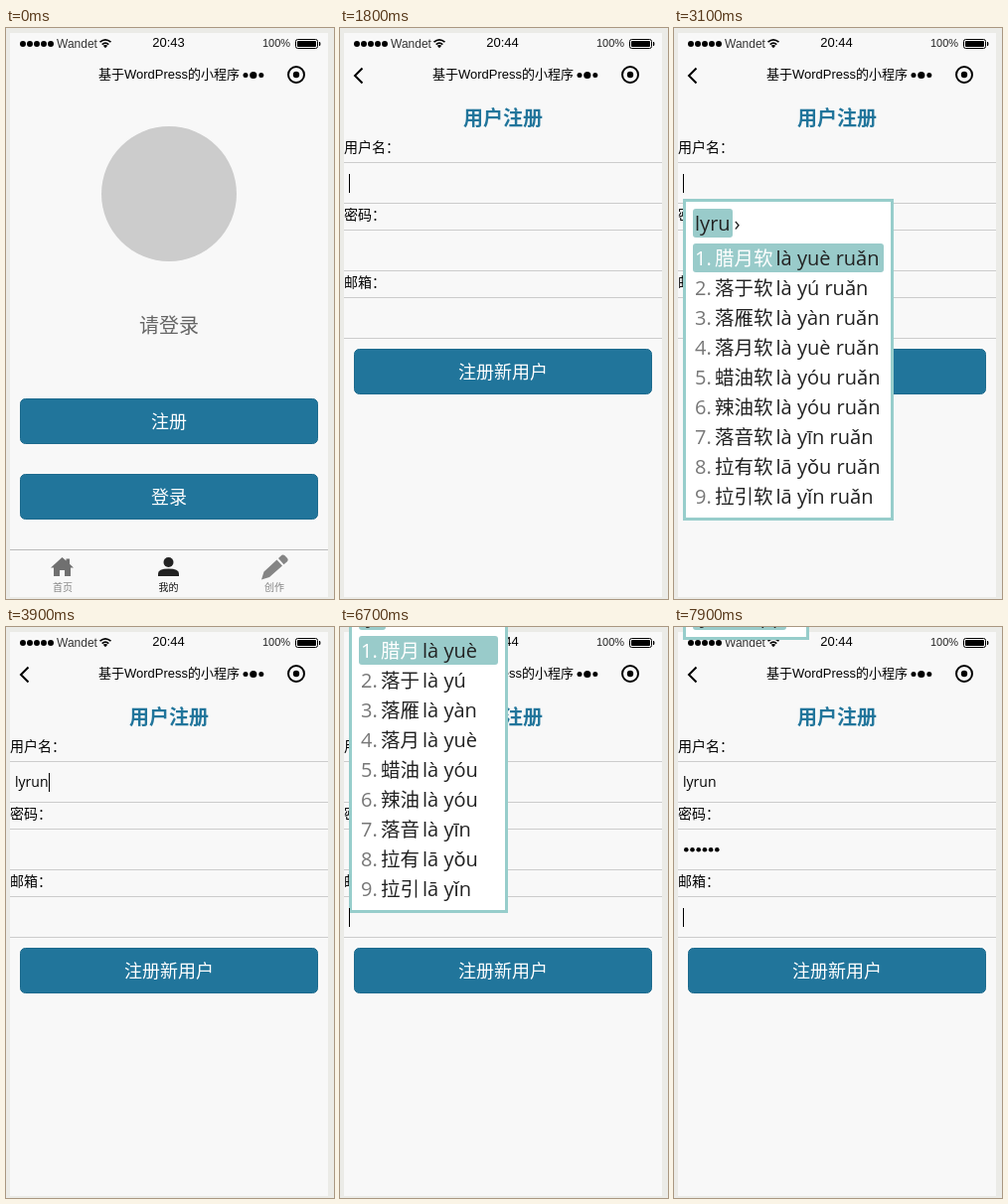
Animation, 330 px wide and 575 px high, one loop 8000 ms. Source, as an HTML page:

```html
<!DOCTYPE html>
<html lang="zh-CN">
<head>
<meta charset="utf-8">
<title>小程序注册</title>
<style>
  html, body { margin: 0; width: 100%; height: 100%; overflow: hidden; background: #ebebe7; }
  body, text { font-family: "Liberation Sans", "Noto Sans CJK SC", "Noto Sans CJK", sans-serif; }
  #stage { position: relative; width: 330px; height: 575px; overflow: hidden; }
  svg { position: absolute; left: 0; top: 0; }
  [data-on] { visibility: hidden; }
  .mid { text-anchor: middle; }
  .label { font-size: 14px; }
  .hint { font-size: 14px; fill: #858585; }
  .tab { font-size: 10px; fill: #858585; text-anchor: middle; }
  .btn { font-size: 18px; fill: #fff; text-anchor: middle; }
  .typed { font: 14px "Open Sans", "Noto Sans", sans-serif; }
  .blue { fill: #21759b; stroke: #1d6a8d; }
  .rule { stroke: #ccc; fill: none; }
  .caret { position: absolute; width: 1px; height: 19px; background: #000; }
  .ime {
    position: absolute; left: 9px; box-sizing: border-box; padding: 7px;
    border: 3px solid #97cdcb; background: #fff; color: #222; white-space: nowrap;
    font: 20px/29px "Open Sans", "Noto Sans", "Noto Sans CJK SC", sans-serif;
  }
  .head, .row { display: flex; height: 29px; }
  .head b { font-weight: 400; padding: 0 2px; border-radius: 3px; background: #99cbca; }
  .head i { font-style: normal; width: 13px; text-indent: 2px; }
  .row { margin-bottom: 1px; border-radius: 3px; padding-left: 2px; }
  .head + .row { margin-top: 6px; background: #99cbca; }
  .num { width: 20px; color: #777; }
  .han { font-size: 19.5px; margin-right: 3px; }
  .head + .row .num, .head + .row .han { color: #fff; }
</style>
</head>
<body>
<div id="stage">
<svg width="330" height="575" viewBox="0 0 330 575">
  <rect x="4" y="5" width="320" height="568" fill="#f8f8f8"/>

  <!-- status and title bars -->
  <g>
    <circle cx="17" cy="16" r="3"/><circle cx="24" cy="16" r="3"/><circle cx="31" cy="16" r="3"/>
    <circle cx="38" cy="16" r="3"/><circle cx="45" cy="16" r="3"/>
    <text x="51" y="19.5" font-size="12" fill="#333">Wandet</text>
    <g fill="none" stroke="#000" stroke-width="1.6">
      <path d="M94.5 14.2Q100 9.4 105.500 14.2M96.700 16.600Q100 13.600 103.300 16.600"/>
    </g>
    <path d="M97.800 17.800Q100 16 102.200 17.800L100 20.200Z"/>
    <text class="mid" x="163.500" y="19" font-size="13" data-on="0-100">20:43</text>
    <text class="mid" x="163.500" y="19" font-size="13" data-on="100-8000">20:44</text>
    <text x="258" y="19" font-size="11" fill="#222">100%</text>
    <rect x="291.500" y="11.500" width="22" height="9" rx="2" fill="none" stroke="#000"/>
    <rect x="293" y="13" width="19" height="6" rx="1"/>
    <path d="M315 14h1q1 2 0 4h-1z"/>
    <text class="mid" x="164" y="51" font-size="13">基于WordPress的小程序</text>
    <circle cx="241" cy="47.500" r="2.500"/><circle cx="248.800" cy="47.500" r="3.600"/><circle cx="256.800" cy="47.500" r="2.500"/>
    <circle cx="292" cy="47" r="8" fill="none" stroke="#000" stroke-width="2"/>
    <circle cx="292" cy="47" r="3.200"/>
    <path d="M22.500 40.500L15 48L22.500 55.500" fill="none" stroke="#000" stroke-width="2" data-on="900-8000"/>
  </g>

  <!-- profile -->
  <g data-on="0-1000">
    <circle cx="164" cy="167" r="68" fill="#ccc"/>
    <text class="mid" x="164" y="307" font-size="20" fill="#666">请登录</text>
    <rect class="blue" x="14.500" y="373.500" width="299" height="45" rx="5"/>
    <text class="btn" x="164" y="403">注册</text>
    <rect class="blue" x="14.500" y="449.500" width="299" height="45" rx="5"/>
    <text class="btn" x="164" y="479">登录</text>
  </g>
  <g data-on="0-900">
    <path d="M4 525.500H324" stroke="#bbb"/>
    <path d="M45 543.500L56.500 533L60.500 536.600V534.500H64V539.800L68 543.500H65V552H59V546H54V552H48V543.500Z" fill="#707070"/>
    <circle cx="163.500" cy="538" r="5" fill="#222"/>
    <path d="M153 552V549.500Q153 544.500 163.500 544.500Q174 544.500 174 549.500V552Z" fill="#222"/>
    <path d="M257 555.500L259.500 547.500L272.500 535.500L278 541.500L265 553ZM274 534L277.500 530.800Q279 530 280.500 531.300L283.300 534.300Q284.300 536 283 537.200L279.500 540.200Z" fill="#858585"/>
    <text class="tab" x="57" y="567">首页</text>
    <text class="tab" x="163.500" y="567" style="fill:#111">我的</text>
    <text class="tab" x="270" y="567">创作</text>
  </g>

  <!-- editor -->
  <g data-on="1000-1200">
    <text class="label" x="9" y="91">标题</text>
    <text class="hint" x="9" y="127">标题</text>
    <text class="label" x="9" y="171">正文</text>
    <text class="hint" x="9" y="198">正文</text>
    <path class="rule" d="M4 101.500H324M4 181.500H324M4 330.500H324M4 438.500H324M4 477.500H324M14.500 336.500h51v51h-51z"/>
    <path d="M4 142.500H324" stroke="#d0c0d2"/>
    <path d="M33 362.500H47M40 355.500V369.500" stroke="#000" stroke-width="2"/>
    <text class="label mid" x="164" y="418">选择分类：七言绝句</text>
    <text class="label" x="13" y="464">发布：</text>
    <rect x="258" y="442" width="52" height="32" rx="16" fill="#04be02"/>
    <circle cx="294" cy="458" r="15" fill="#fdfdfd"/>
    <rect x="4.500" y="484.500" width="319" height="45" rx="5" fill="#f7f7f7" stroke="#d8d8d8"/>
    <text class="btn" x="164" y="514" style="fill:#b5b5b5">保存</text>
    <rect x="4" y="525" width="320" height="6" fill="#f8f8f8" data-on="1000-1100"/>
  </g>

  <!-- sign-up form -->
  <g data-on="1200-8000">
    <text class="mid" x="164" y="98" font-size="20" font-weight="700" fill="#21759b">用户注册</text>
    <text class="label" x="4" y="125">用户名：</text>
    <text class="label" x="4" y="193">密码：</text>
    <text class="label" x="4" y="261">邮箱：</text>
    <path class="rule" d="M4 135.500H324M4 176.500H324M4 203.500H324M4 244.500H324M4 271.500H324M4 312.500H324"/>
    <rect class="blue" x="14.500" y="323.500" width="299" height="45" rx="5"/>
    <text class="btn" x="164" y="353">注册新用户</text>
    <text class="typed" x="9" y="161" data-on="3900-8000">lyrun</text>
    <g id="dots"></g>
  </g>
</svg>
</div>
<script>
const LOOP = 8000, SVG = "http://www.w3.org/2000/svg";
const stage = document.getElementById("stage");

function add(parent, html, from, to) {
  parent.insertAdjacentHTML("beforeend", html);
  parent.lastElementChild.dataset.on = from + "-" + to;
  return parent.lastElementChild;
}

// "汉字pinyin,汉字pinyin" -> [[hanzi, pinyin], ...]
const parse = s => s.split(",").map(w => w.match(/^([\u4e00-\u9fff]+)(.+)$/).slice(1));
const extend = (list, han, pin) => list.map(([h, p]) => [h + han, p + " " + pin]);

const first = parse("了le,来lái,领lǐng,落luò,乱luàn,蓝lán,练liàn,六liù,拉lā");
const second = parse("拉lā,啦la,辣là,蜡là,腊là,落là,喇lǎ,垃lā,剌lá");
const pairs = parse("腊月là yuè,落于là yú,落雁là yàn,落月là yuè,蜡油là yóu,辣油là yóu,落音là yīn,拉有lā yǒu,拉引lā yǐn");
const soft = extend(pairs, "软", "ruǎn"), moist = extend(pairs, "润", "rùn");

function ime(from, to, top, typed, list, width) {
  const rows = (list || []).map(([h, p], i) =>
    `<div class="row"><span class="num">${i + 1}.</span><span class="han">${h}</span><span>${p}</span></div>`);
  const size = list ? `width:${width}px;height:324px` : "height:49px";
  add(stage, `<div class="ime" style="top:${top}px;${size}">
    <div class="head"><b>${typed}</b><i>›</i></div>${rows.join("")}</div>`, from, to);
}

function typeName(top, times) {
  const steps = [["l", first, 160], ["ly", second, 160], ["lyr", pairs, 160], ["lyru", soft, 212], ["lyrun", moist, 212]];
  steps.forEach((s, i) => ime(times[i], times[i + 1], top, ...s));
}

typeName(172, [2700, 2800, 2900, 3100, 3200, 3900]);
typeName(-36, [6500, 6600, 6700, 6900, 7000, 7400]);
ime(7400, 7700, -36, "lyrun@");
ime(7700, 7900, -36, "lyrun@p");
ime(7900, LOOP, -36, "lyrun@pp");

function caret(from, to, x, y) {
  add(stage, `<div class="caret" style="left:${x}px;top:${y}px"></div>`, from, to);
}

caret(1800, 2200, 9, 147);
caret(2700, 3200, 9, 147);
caret(3700, 3900, 9, 147);
caret(3900, 4100, 43, 147);
caret(4100, 4600, 9, 215);
caret(5700, 6200, 9, 283);
caret(6700, 7100, 9, 283);
caret(7600, LOOP, 9, 283);

// password: one dot per key press, caret follows
const keys = [4700, 4800, 4900, 5100, 5300, 5500, 5700];
keys.slice(0, 6).forEach((t, i) => {
  const dot = document.createElementNS(SVG, "circle");
  dot.setAttribute("cx", 12.3 + 6.2 * i);
  dot.setAttribute("cy", 224.3);
  dot.setAttribute("r", 2.3);
  dot.dataset.on = t + "-" + LOOP;
  document.getElementById("dots").append(dot);
  caret(t, keys[i + 1], Math.round(9 + 6.2 * (i + 1)), 215);
});

const layers = [...document.querySelectorAll("[data-on]")].map(el => [el, ...el.dataset.on.split("-").map(Number)]);

function draw(t) {
  for (const [el, from, to] of layers) {
    el.style.visibility = t >= from && t < to ? "inherit" : "hidden";
  }
}

const start = performance.now();
function tick() {
  draw((performance.now() - start) % LOOP);
  requestAnimationFrame(tick);
}
draw(0);
tick();
</script>
</body>
</html>
```
